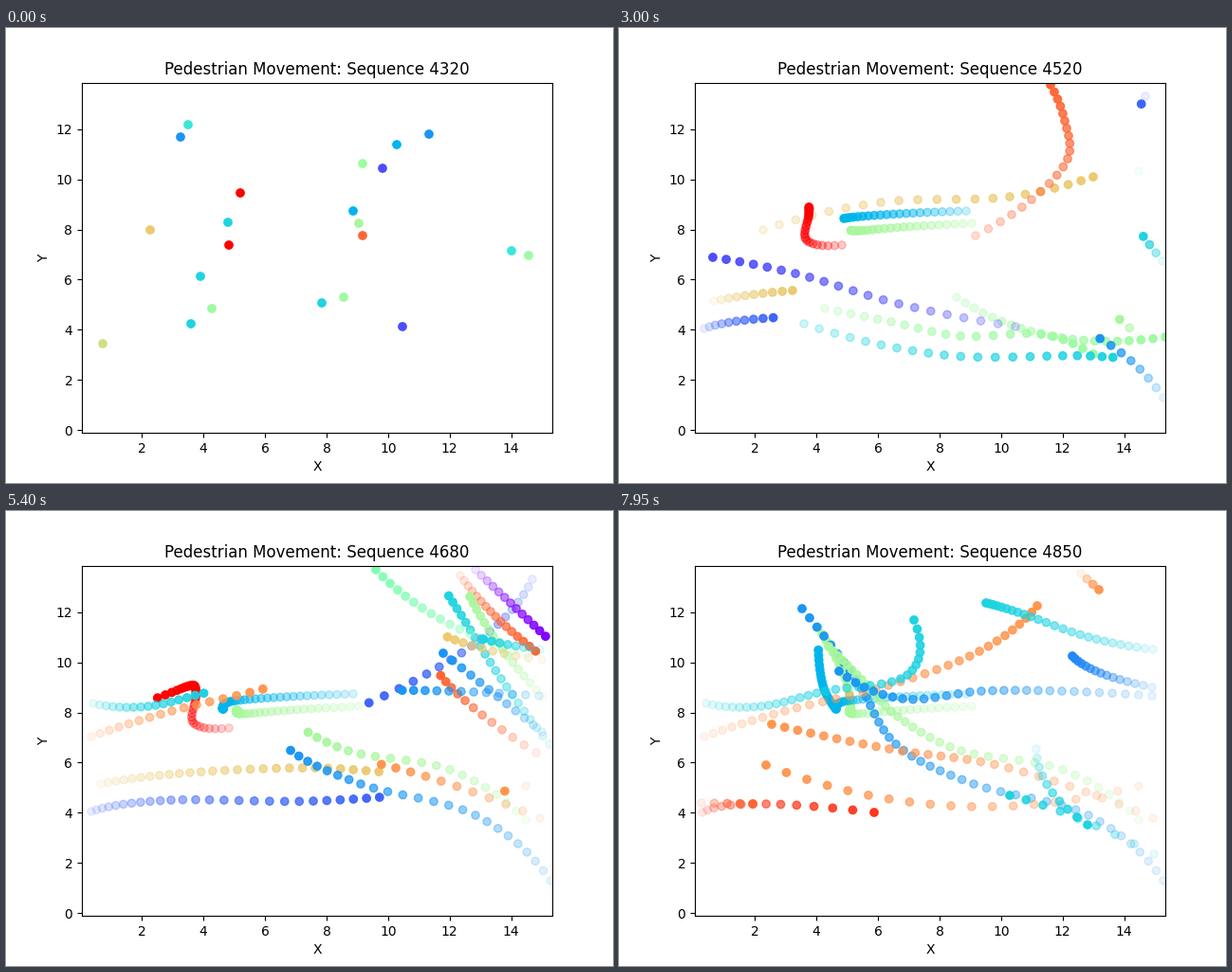
Write a matplotlib script that moves like this. It is 640x480 px and loops after 8000 ms.

```python
import numpy as np
import matplotlib.pyplot as plt
from matplotlib.animation import FuncAnimation

TICKS_PER_STEP = 3
UNSEEN_STEPS = 3  # history of those already walking at the start

# Positions on the rainbow colour map
VIOLET, INDIGO, ROYAL, AZURE, BLUE, SKY = 0.0, .1, .13, .18, .2, .25
CYAN, TURQUOISE, MINT, GREEN, LIME = .31, .36, .5, .56, .58
OLIVE, SAND, ORANGE, CORAL, SCARLET, RED = .66, .71, .8, .87, .93, 1.0

walkers = []


def to_data(px, py):
    """Convert stage pixels to axis units."""
    return 2 + (px - 143.25) / 32.45, (424.08 - py) / 26.44


def glide(u, keys):
    """Smooth curve through evenly timed keys, for u from 0 to 1."""
    spans = len(keys) - 1
    slope = np.gradient(keys, edge_order=min(spans, 2))
    i = np.minimum((u * spans).astype(int), spans - 1)
    t = u * spans - i
    ease = t * t * (3 - 2 * t)
    return (keys[i] * (1 - ease) + keys[i + 1] * ease
            + t * (1 - t) * ((1 - t) * slope[i] - t * slope[i + 1]))


def walk(hue, first, last, *keys):
    """Add a pedestrian passing the keys (stage pixels) at an even pace."""
    u = np.linspace(0, 1, last - first + 1)
    px, py = (glide(u, np.array(axis, float)) for axis in zip(*keys))
    past = UNSEEN_STEPS if first == 0 else 0
    walkers.append((plt.cm.rainbow(hue), first, last,
                    np.column_stack(to_data(px, py)), past))


# Already walking at the start
walk(OLIVE, 0, 1, (102, 333), (90, 335))
walk(BLUE, 0, 8, (184, 115), (112, 66))
walk(TURQUOISE, 0, 8, (192, 102), (123, 64))
walk(SAND, 0, 28, (152, 213), (276, 184), (412, 178), (512, 153), (575, 122))
walk(RED, 0, 10, (247, 174), (203, 124), (157, 77))
walk(CYAN, 0, 16, (234, 205), (183, 205), (148, 213), (113, 220), (73, 225))
walk(RED, 0, 42, (235, 229), (198, 224), (200, 198), (200, 188), (195, 184),
     (168, 194), (88, 225))
walk(CYAN, 0, 18, (205, 262), (388, 277), (573, 261))
walk(GREEN, 0, 25, (217, 296), (287, 310), (360, 325), (445, 323), (500, 344), (564, 386))
walk(CYAN, 0, 27, (195, 312), (343, 345), (497, 346), (574, 356))
walk(GREEN, 0, 20, (356, 284), (456, 325), (576, 326))
walk(CYAN, 0, 18, (333, 290), (381, 311), (462, 359), (559, 408))
walk(CORAL, 0, 20, (376, 219), (435, 181), (473, 138), (470, 98), (455, 60))
walk(LIME, 0, 54, (372, 206), (300, 210), (249, 214), (243, 210), (245, 211),
     (237, 172), (205, 116))
walk(SKY, 0, 54, (366, 193), (296, 196), (243, 200), (230, 204), (228, 208),
     (215, 184), (210, 141))
walk(GREEN, 0, 12, (376, 143), (428, 108), (466, 62))
walk(INDIGO, 0, 12, (397, 148), (446, 108), (473, 63))
walk(SKY, 0, 2, (412, 123), (428, 106))
walk(BLUE, 0, 8, (446, 112), (463, 85), (471, 60))
walk(TURQUOISE, 0, 10, (533, 235), (558, 193), (572, 150))
walk(GREEN, 0, 12, (551, 240), (522, 143), (486, 62))
walk(INDIGO, 0, 21, (418, 315), (295, 291), (186, 259), (85, 240))

# Arriving later
walk(SCARLET, 10, 18, (446, 85), (471, 88), (512, 98))
walk(ROYAL, 11, 51, (90, 317), (174, 305), (324, 306), (461, 295), (590, 272))
walk(SAND, 11, 51, (100, 288), (194, 276), (326, 271), (460, 277), (590, 255))
walk(BLUE, 13, 53, (574, 390), (495, 321), (374, 288), (292, 246), (250, 178), (193, 103))
walk(CYAN, 17, 41, (573, 246), (522, 177), (480, 110), (448, 61))
walk(LIME, 18, 53, (548, 326), (468, 273), (361, 253), (294, 217), (256, 178), (221, 143))
walk(ROYAL, 19, 52, (555, 72), (469, 157), (297, 232), (85, 250))
walk(MINT, 20, 36, (548, 151), (458, 114), (390, 62))
walk(ORANGE, 21, 53, (90, 238), (175, 211), (284, 184), (380, 148), (441, 100))
walk(CYAN, 21, 53, (92, 203), (150, 206), (218, 190), (304, 173), (311, 115))
walk(CORAL, 21, 38, (479, 68), (519, 114), (572, 158))
walk(LIME, 21, 40, (566, 196), (511, 128), (478, 64))
walk(VIOLET, 24, 37, (495, 62), (575, 138))
walk(CORAL, 25, 46, (559, 255), (484, 200), (441, 150), (390, 66))
walk(BLUE, 25, 53, (562, 195), (467, 190), (382, 190), (299, 198), (232, 169))
walk(BLUE, 25, 47, (565, 233), (461, 150), (350, 62))
walk(SAND, 27, 48, (565, 157), (482, 139), (434, 113), (393, 62))
walk(ORANGE, 26, 53, (563, 324), (411, 271), (285, 251), (161, 225))
walk(CYAN, 29, 53, (563, 146), (495, 133), (427, 109), (387, 97))
walk(ORANGE, 29, 34, (543, 245), (497, 204))
walk(LIME, 31, 34, (549, 240), (522, 231))
walk(BLUE, 31, 34, (563, 276), (527, 258))
walk(ORANGE, 35, 53, (548, 290), (350, 311), (155, 268))
walk(AZURE, 39, 53, (562, 186), (508, 171), (478, 153))
walk(SCARLET, 40, 53, (88, 318), (148, 309), (269, 318))
walk(CYAN, 44, 53, (440, 251), (454, 293), (494, 331))
walk(CYAN, 45, 53, (564, 362), (484, 324), (412, 300))
walk(CORAL, 49, 53, (87, 308), (141, 309))
walk(ORANGE, 50, 53, (487, 66), (506, 83))

fig, ax = plt.subplots(figsize=(6.4, 4.8), dpi=100)
(left, bottom), (right, top) = to_data(80, 427.2), to_data(576, 57.6)
ax.set(xlim=(left, right), ylim=(bottom, top), xlabel="X", ylabel="Y")
title = ax.set_title("")
dots = ax.scatter([], [], s=36, linewidths=1)


def update(tick):
    step = tick // TICKS_PER_STEP
    places, colors = [], []
    for color, first, last, path, past in walkers:
        if first <= step <= last:
            count = step - first + 1
            rgba = np.tile(color, (count, 1))
            rgba[:, 3] = np.linspace(.1, 1, count + past)[past:]
            places.append(path[:count])
            colors.append(rgba)
    dots.set_offsets(np.vstack(places))
    dots.set_facecolor(np.vstack(colors))
    dots.set_edgecolor(np.vstack(colors))
    title.set_text(f"Pedestrian Movement: Sequence {4320 + 10 * step}")
    return dots, title


anim = FuncAnimation(fig, update, frames=160, interval=50, repeat_delay=0)
plt.show()
```
